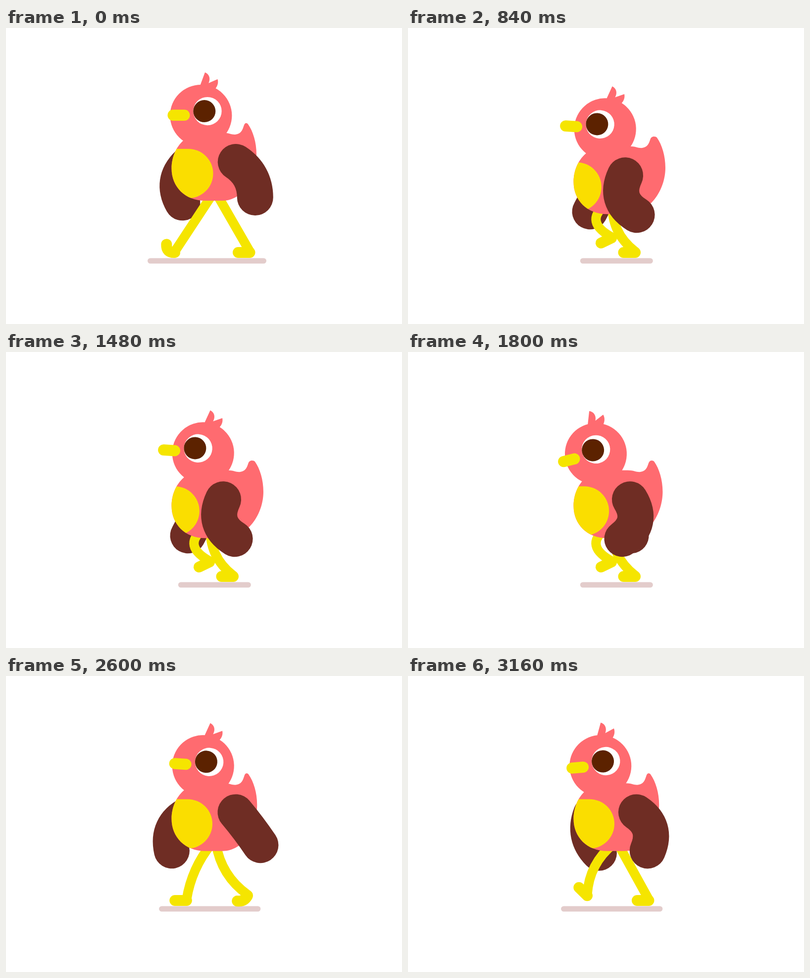
Recreate the animation shown at these times as an HTML page with a canvas. Size 800 px wide and 600 px high, loop 3200 ms.

```html
<!DOCTYPE html>
<html lang="en">
<head>
<meta charset="utf-8">
<title>Walking bird</title>
<style>
html, body { margin: 0; width: 100%; height: 100%; overflow: hidden; background: #fff; }
canvas { display: block; }
</style>
</head>
<body>
<canvas id="stage" width="800" height="600"></canvas>
<script>
const ctx = document.getElementById('stage').getContext('2d');
const PINK = '#ff6b70', YELLOW = '#f5e500', BELLY = '#fade00';
const BROWN = '#6f2d24', PUPIL = '#5c2200', GROUND = '#e3cccb';
const STEP = 40, CYCLE = 16, HALF = CYCLE / 2;

const wave = (p, peak = 0) => Math.cos(Math.PI * (p - peak) / HALF);
const swell = f => f * (1.5 - 0.5 * f * f);
const ease = t => {
  t = Math.min(1, Math.max(0, t));
  return t * t * (3 - 2 * t);
};
const liftAt = p => (1 - wave(2 * p)) / 2;

function stroke(color, width, x0, y0, cx, cy, x1, y1) {
  ctx.strokeStyle = color;
  ctx.lineWidth = width;
  ctx.beginPath();
  ctx.moveTo(x0, y0);
  ctx.quadraticCurveTo(cx, cy, x1, y1);
  ctx.stroke();
}

// Stroke whose middle is pushed sideways by bend
function limb(color, width, x0, y0, x1, y1, bend = 0) {
  const dx = x1 - x0, dy = y1 - y0, len = Math.hypot(dx, dy);
  stroke(color, width, x0, y0,
    (x0 + x1) / 2 + bend * dy / len, (y0 + y1) / 2 - bend * dx / len, x1, y1);
}

function disc(color, x, y, r) {
  ctx.fillStyle = color;
  ctx.beginPath();
  ctx.arc(x, y, r, 0, 7);
  ctx.fill();
}

// The foot lands at phase 0, leaves the ground at HALF and swings forward
function leg(phase) {
  const q = phase % CYCLE, swinging = q >= HALF;
  const t = (q % HALF) / HALF, arc = Math.sin(Math.PI * t);
  const lift = liftAt(q);

  const travel = swinging ? 1 - t * t * (2 - t) : t + 0.83 * t ** 1.5 * (1 - t);
  const ankleX = 341 + 151.5 * travel;
  const ankleY = 455 - (swinging ? 32.5 * arc ** 1.25 : 0);
  const knee = swinging ? 66 * arc : 38 * Math.max(0, Math.sin(Math.PI * q / 7));
  limb(YELLOW, 19, 421.5 - 5 * wave(q) - 12 * lift, 338 + 16 * lift,
    ankleX, ankleY - 2, -knee);

  const pitch = 0.48 * ease(q - 8) - 1.26 * ease((q - 12.8) / 2.2) - 0.78 * ease(1 - q);
  const curl = 13 * ease(1 - q) + 8 * ease(1 - Math.abs(q - 9));
  limb(YELLOW, 22, ankleX, ankleY,
    ankleX - 23.5 * Math.cos(pitch), ankleY + 23.5 * Math.sin(pitch), curl);
}

function farWing(p, lift, bob) {
  const c = wave(p, 2.3);
  limb(BROWN, 72, 388 - 20 * wave(p), 275 + bob, 409 - 85 * c,
    356 - 12 * lift - 7 * Math.abs(c) ** 3 + bob, -32 * wave(p, 0.6));
}

function nearWing(p, bob) {
  const c = wave(p, 1.55);
  limb(BROWN, 73, 443.5 + 21 * wave(p, 0.4), 271.5 + bob, 447.5 + 68 * c,
    351.5 - 14.5 * Math.abs(c) ** 3 + bob, -37 * swell(wave(p, 5.1)));
}

function body(p, lift, bob) {
  const turn = 1 - wave(p);
  const d = 4.7 * lift + 7.2 * turn, e = 0.65 * d;
  const shape = new Path2D(`M362 225 C345 238 334.5 260 334.5 285
    C334.5 322 362 350 402 350 H438
    C${480 + d * 0.7} 350 ${506 + d} 300 ${506 + d} 256
    C${506 + d} 232 ${499 + d} 209 ${489 + d} 195
    C${486 + d} 191.5 ${482.5 + e} 191.5 ${480.5 + e} 198
    C${477.5 + e} 207 ${475 + e} 215 ${462 + e} 216
    C${455 + e} 216 ${450 + e} 212.5 ${438 + e} 212.5 H400Z`);
  ctx.save();
  ctx.translate(0, bob);
  ctx.fillStyle = PINK;
  ctx.fill(shape);
  ctx.clip(shape);
  ctx.fillStyle = BELLY;
  ctx.beginPath();
  ctx.roundRect(218.5 - 20 * turn, 245, 200, 100, 50);
  ctx.fill();
  ctx.restore();
}

const TUFT = new Path2D('M-2-60L8.2-87.5C17-84 20-75 15.5-65.5L33.7-73.5C36-66 33-58 28-53Z');

function head(p, bob) {
  const face = -4 + 17.3 * wave(p);
  ctx.save();
  ctx.translate(394, 237.4 + bob);
  ctx.rotate((-5 + 12.8 * wave(p, 3)) * Math.PI / 180);
  ctx.translate(0, -60);
  disc(PINK, 0, 0, 62.5);
  ctx.fill(TUFT);
  disc('#fff', face - 0.2, -8.8, 28.7);
  disc(PUPIL, face - 6.4, -8.8, 22.5);
  limb(YELLOW, 22.5, face - 69.5, -0.7, face - 47, -0.7);
  ctx.restore();
}

function ground(p) {
  const s = Math.abs(wave(p, 4)), k = s * (0.87 + 0.19 * s);
  limb(GROUND, 11, 291.5 + 64 * k, 472, 520.5 - 32.3 * k, 472);
}

function draw(now) {
  const p = Math.floor(now / STEP) % CYCLE;
  const lift = liftAt(p), bob = 32 * lift;
  ctx.clearRect(0, 0, 800, 600);
  ctx.lineCap = 'round';
  ground(p);
  farWing(p, lift, bob);
  leg(p);
  leg(p + HALF);
  body(p, lift, bob);
  head(p, bob);
  nearWing(p, bob);
}

let start;
function tick(now) {
  start ??= now;
  draw(now - start);
  requestAnimationFrame(tick);
}
draw(0);
requestAnimationFrame(tick);
</script>
</body>
</html>
```
